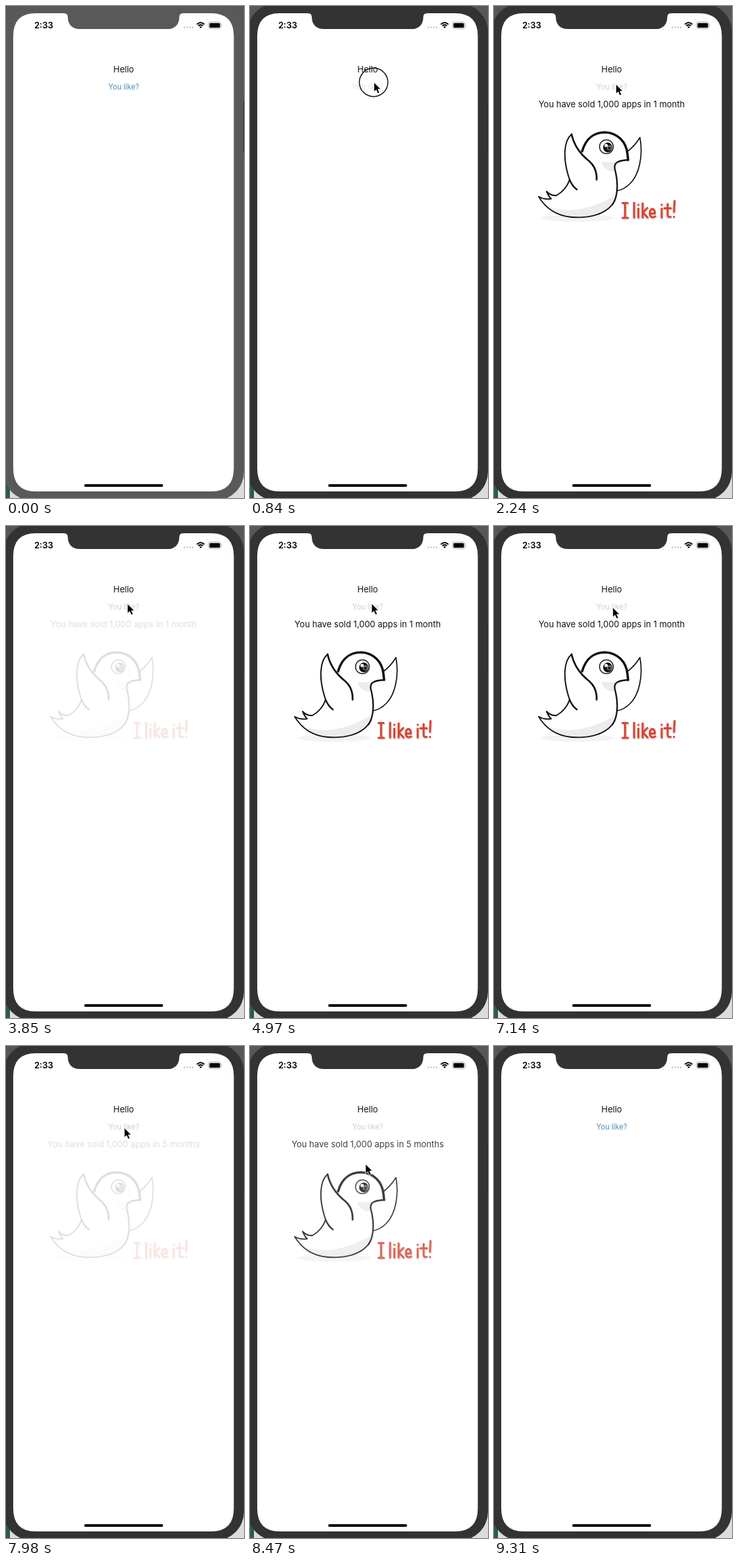
Write an HTML page that moves like this. It is 362 by 748 pixels and loops after 9.45 s.

```html
<!DOCTYPE html>
<html lang="en">
<head>
<meta charset="utf-8">
<title>You like?</title>
<style>
  html, body { margin: 0; width: 100%; height: 100%; overflow: hidden; background: #fff; }
  svg { display: block; width: 100%; height: 100%; }
  text { font: 13px Inter, "Liberation Sans", sans-serif; text-anchor: middle; }
  .line { fill: none; stroke: #111; stroke-linecap: round; stroke-linejoin: round; }
  #bezel { fill: #595959; }
  #bezel.active { fill: #333; }
</style>
</head>
<body>
<svg viewBox="0 0 362 748">
  <!-- desktop behind the phone -->
  <rect width="362" height="748" fill="#555857"/>
  <rect y="700" width="362" height="48" fill="#dcdcdc"/>
  <rect y="700" width="6" height="48" fill="#2b5a52"/>

  <!-- phone -->
  <rect id="bezel" x="-4" y="-4" width="366" height="756" rx="44"/>
  <path d="M361.5 145V223" stroke="#2b2b2b"/>
  <path fill="#fff" d="M45 11H88Q94 11 94 17C94 28 101 35 112 35H246C257 35 263.500 28 263.500 17Q263.500 11 269.500 11H312Q346.500 11 346.500 46V703Q346.500 738 312 738H45Q11 738 11 703V46Q11 11 45 11Z"/>

  <!-- status bar -->
  <text x="57.300" y="34" style="font-size:13px;font-weight:600">2:33</text>
  <path d="M271.300 32.500H285" stroke="#c4c4c4" stroke-width="2.600" stroke-linecap="round" stroke-dasharray="0 4.200"/>
  <g fill="none" stroke="#000" stroke-width="2">
    <path d="M290.300 28Q296 22.500 301.700 28"/>
    <path d="M292.600 30.300Q296 27 299.400 30.300"/>
  </g>
  <path d="M294 31.800Q296 30.200 298 31.800L296 34Z"/>
  <rect x="308" y="24.500" width="19" height="10" rx="3" fill="none" stroke="#aaa"/>
  <rect x="309.500" y="26" width="16" height="7" rx="1.600"/>
  <path d="M328.300 28Q329.800 29.500 328.300 31Z" fill="#999"/>

  <text x="179" y="100.700" fill="#111">Hello</text>
  <text id="button" x="179" y="126.700" style="font-size:11.300px">You like?</text>

  <g id="details">
    <text id="sales" x="179" y="154.200" fill="#111"></text>
    <ellipse cx="128" cy="322.500" rx="56" ry="5.500" fill="#f3f3f3"/>

    <!-- bird -->
    <path fill="#fff" d="M68 290C78 297 88 293 95 290C106 283 111 274 115 264L134 221C140 200 157 192 170 193C190 194 201 208 204 234Q183 234 184 246C188 262 189 290 180 303C166 320 140 323 118 321C95 319 79 308 68 290Z"/>
    <path fill="#ececec" d="M84 306Q130 320 184 288Q180 305 162 314Q140 322 118 321Q98 318 84 306ZM163 237Q184 239 203 235Q184 237 184 252Q168 252 163 237Z"/>
    <path class="line" stroke-width="1.700" d="M202 222Q214 213 222 200C227 228 221 256 207 270Q198 279 187 281"/>
    <path class="line" stroke-width="2" d="M118 195C106 205 104 232 115 264C111 276 104 283 95 288Q87 289 80 282Q84 291 87 293Q77 295 68 290"/>
    <path class="line" stroke-width="2.800" d="M118 195C122 213 132 226 145 236Q157 247 156 264"/>
    <path class="line" stroke-width="2.400" d="M115 264Q119 274 126 279"/>
    <path class="line" stroke-width="3.600" d="M134 221C140 200 154 192 169 192C188 193 201 206 203 225L204 234"/>
    <path class="line" stroke-width="2.300" d="M204 234C190 235 181 237 184 249C189 267 189 290 180 302"/>
    <path class="line" stroke-width="1.800" d="M184 295C173 318 142 323 118 321C95 319 79 308 68 290"/>
    <circle cx="171" cy="214" r="10.500" fill="#fff" stroke="#222" stroke-width="1.500"/>
    <ellipse cx="173" cy="215" rx="7" ry="7.500" fill="#111"/>
    <circle cx="175.500" cy="215.500" r="3.800" fill="#777"/>
    <circle cx="175.500" cy="216" r="2" fill="#111"/>
    <circle cx="170.500" cy="212" r="2.500" fill="#fff"/>

    <!-- hand lettering -->
    <defs>
      <path id="lettering" d="M195.500 299.500H203M199.300 299.500V321.500M195.500 322H203.500
        M213 299V321.500M219.500 308V321.500M219.500 302V302.100
        M226 300V321.500M233 307L226.500 314L233.500 321.500
        M237.500 315.500H244.500Q244.500 308.500 240.500 308.500Q236.500 310 237 316.500Q238.500 323.500 245 320
        M255 308V321.500M255 302V302.100M264 301V317Q264 322 268.500 320.500M259 307.500H269
        M274.500 296.500L273.700 313M273.600 320.500V320.600"/>
    </defs>
    <g fill="none" stroke-linecap="round" stroke-linejoin="round">
      <use href="#lettering" stroke="#e4d6d4" stroke-width="4.500" x=".7" y=".9"/>
      <use href="#lettering" stroke="#d8432f" stroke-width="3"/>
    </g>
  </g>

  <rect x="119" y="727" width="120" height="4" rx="2"/>

  <g id="cursor">
    <circle id="ring" r="21.700" fill="none" stroke="#111" stroke-width="1.500"/>
    <path d="M.5 0V14.500L3.900 11.500L6.300 17L9 15.800L6.600 10.500H11Z" stroke="#fff" stroke-width=".8"/>
  </g>
</svg>

<script>
const LOOP = 9450, STEP = 70;
const SHOWN_FOR = 1750, FADE_DELAY = 190, FADE = 1000, PRESS = 140;
const taps = [840, 3430, 5460, 7560];
const idleTap = { from: 2520, to: 2730 };
const focusAt = 490;

// time, x, y of the pointer tip
const path = [
  [420, 262, 731], [770, 188, 116], [2100, 188, 116], [2240, 185, 119],
  [2520, 184, 118.5], [4970, 184.5, 118], [5320, 182, 122], [6300, 181.5, 123],
  [7560, 179.5, 124.5], [8400, 179.5, 124.5], [8750, 139, 654], [8820, 128, 695]
];
const cursorGone = 8890;

const $ = id => document.getElementById(id);
const clamp = x => Math.min(1, Math.max(0, x));
const smooth = x => x * x * (3 - 2 * x);
const show = (el, on) => el.setAttribute("visibility", on ? "visible" : "hidden");

function pointerAt(t) {
  let i = 0;
  while (i < path.length - 2 && t >= path[i + 1][0]) i++;
  const [t0, x0, y0] = path[i], [t1, x1, y1] = path[i + 1];
  const k = clamp((t - t0) / (t1 - t0));
  const e = i === 0 ? 1 - (1 - k) ** 2 : i === path.length - 3 ? smooth(k) : k;
  return [x0 + (x1 - x0) * e, y0 + (y1 - y0) * e];
}

function draw(t) {
  const tap = taps.find(s => t >= s && t < s + SHOWN_FOR);
  const age = tap === undefined ? -1 : t - tap;
  const pressed = age >= 0 && age < PRESS;
  const ring = pressed || (t >= idleTap.from && t < idleTap.to);

  $("bezel").classList.toggle("active", t >= focusAt);
  $("button").setAttribute("fill", age < 0 ? "#4a8db9" : pressed ? "#e4e4e4" : "#cfcfcf");
  $("details").setAttribute("opacity", age < 0 ? 0 : smooth(clamp((age - FADE_DELAY) / FADE)));
  $("sales").textContent = "You have sold 1,000 apps in " + (t >= taps[3] ? "5 months" : "1 month");

  show($("cursor"), t >= path[0][0] && t < cursorGone);
  $("ring").setAttribute("opacity", ring ? 1 : 0);
  $("cursor").setAttribute("transform", `translate(${pointerAt(t)})`);
}

const start = performance.now();
function tick() {
  const t = (performance.now() - start) % LOOP;
  draw(Math.floor(t / STEP) * STEP);
  requestAnimationFrame(tick);
}
tick();
</script>
</body>
</html>
```
